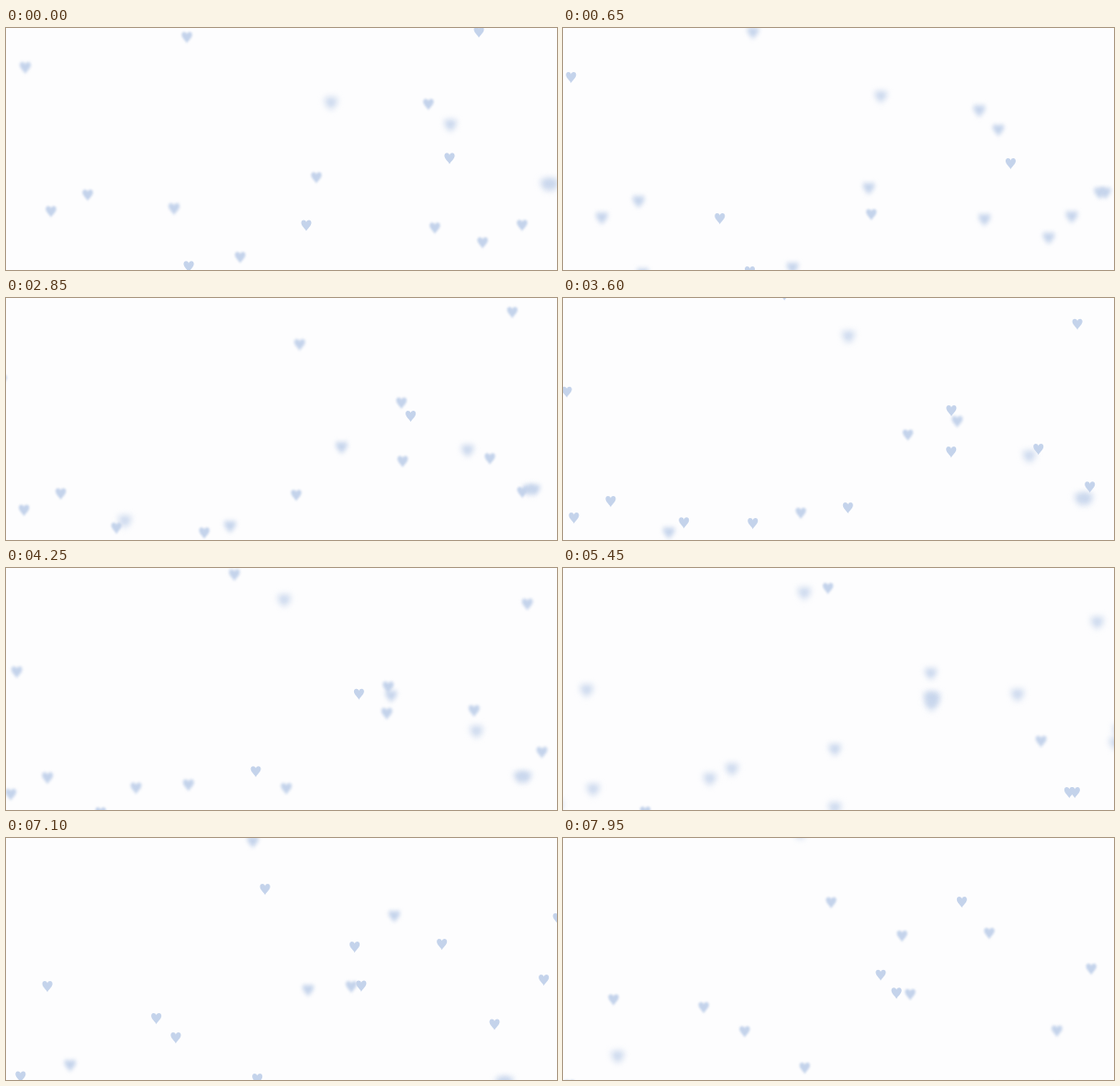
Recreate the animation shown at these times as an HTML page. Size 600x264 px, loop 8000 ms.

```html
<!DOCTYPE html>
<html lang="en">
<head>
<meta charset="utf-8">
<title>Drifting hearts</title>
<style>
  html, body { margin: 0; width: 100%; height: 100%; overflow: hidden; background: #fdfdfe; }
  svg { display: block; width: 100%; height: 100%; }
</style>
</head>
<body>
<svg id="stage" viewBox="0 0 600 264"></svg>
<script>
const LOOP = 8000, STEP = 50;
const HEART = 'M0 6.5C-1.2 3.6-5.5 1-5.5-2.6C-5.5-6.3-1-6.5 0-3.2C1-6.5 5.5-6.3 5.5-2.6C5.5 1 1.2 3.6 0 6.5Z';
const NS = 'http://www.w3.org/2000/svg';
const stage = document.getElementById('stage');
const hearts = [];

function addHeart() {
  const node = document.createElementNS(NS, 'g');
  const shape = document.createElementNS(NS, 'path');
  shape.setAttribute('d', HEART);
  shape.setAttribute('fill', '#c4d3eb');
  node.append(shape);
  stage.append(node);
  return { node, shape };
}

// Hearts of one flock share a drift in px/s and go in and out of focus together.
function flock([vx, vy], starts, { peak = 1.4, period = 4 } = {}) {
  for (const [x, y] of starts) {
    const { node, shape } = addHeart();
    hearts.push(t => {
      const haze = (1 + Math.cos((t - peak) / period * 2 * Math.PI)) / 2;
      const size = 1 + 0.2 * haze;
      node.setAttribute('transform', `translate(${x + vx * t} ${y + vy * t}) scale(${size})`);
      shape.style.filter = `blur(${0.5 + 2.7 * haze}px)`;
    });
  }
}

// up and left
flock([-12.3, -14], [[562, 215], [467, 218], [251, 296], [673, 254], [361, 362]]);
flock([-12, -11], [[354, 82], [155, 326]], { peak: 0 });
// down and left
flock([-7.7, 18.2], [[338, 163], [255, 250]]);
flock([-6.9, 13.5], [[589, 171], [595, 171]], { peak: 3.7 });
flock([-18.8, 16.4], [[183, 197], [21, 43]], { peak: 2.9 });
flock([-10.3, 11], [[460, 83], [89, 182], [49, 200]]);
flock([-15.2, 7.9], [[484, 106]], { peak: 5.4, period: 6.2 });
// up and right
flock([13.5, -18.3], [[327, 215], [515, 4]], { peak: 2.1 });
flock([20, -19.6], [[187, 305]], { peak: 2.1 });
flock([15.2, -7.8], [[77, 273], [519, 234], [197, 10]]);
// down and right
flock([11.7, 17], [[-38, 41], [199, -65], [518, -33]]);
flock([6.9, 8.6], [[483, 142], [199, 260]], { peak: 3.7, period: 6.2 });

function draw(ms) {
  const t = Math.floor(ms % LOOP / STEP) * STEP / 1000;
  hearts.forEach(move => move(t));
}

const start = performance.now();
function tick() {
  draw(performance.now() - start);
  requestAnimationFrame(tick);
}
tick();
</script>
</body>
</html>
```
